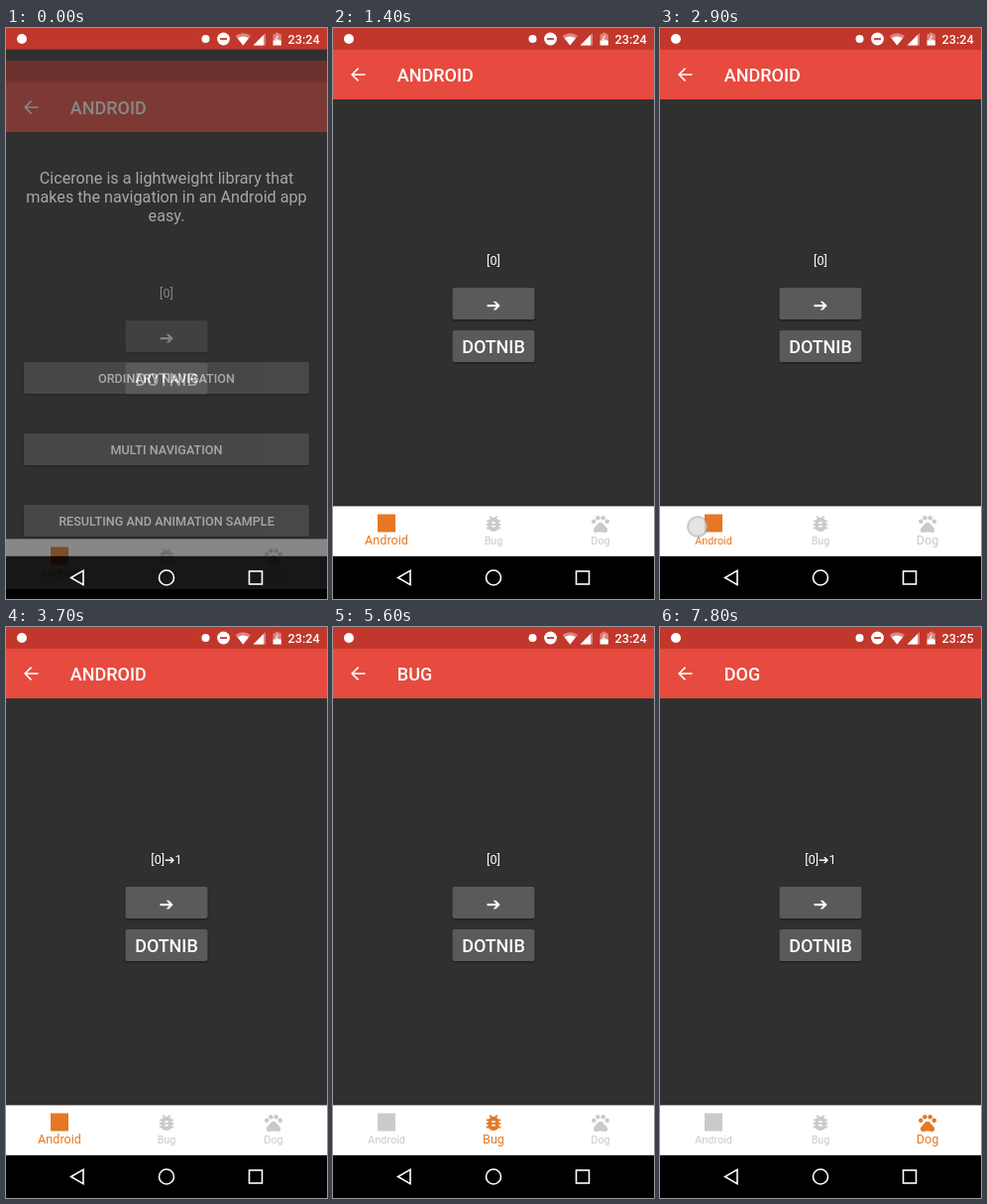
An HTML page for the animation above (8 s loop, 324x576 px).

```html
<!DOCTYPE html>
<html lang="en">
<head>
<meta charset="utf-8">
<title>Tab navigation sample</title>
<style>
  html, body { margin: 0; width: 100%; height: 100%; overflow: hidden; background: #000; }
  svg { display: block; width: 100%; height: 100%; font: 12.6px Roboto, "DejaVu Sans", sans-serif; }
  text { fill: #fff; white-space: pre; }
  .mid { text-anchor: middle; }
  .med { font-weight: 500; }
  .big { font-size: 18px; }
  .line { fill: none; stroke: #fff; stroke-width: 1.6; }
  .btn { fill: #5a595b; filter: drop-shadow(0 1px .8px rgba(0, 0, 0, .45)); }
  .tab { fill: currentColor; stroke: none; }
  .tab text { fill: currentColor; }
</style>
</head>
<body>
<svg viewBox="0 0 324 576">
  <defs>
    <radialGradient id="spot">
      <stop offset="0" stop-color="#e4e4e4" stop-opacity=".9"/>
      <stop offset=".7" stop-color="#dadada" stop-opacity=".75"/>
      <stop offset=".86" stop-color="#a0a0a0" stop-opacity=".6"/>
      <stop offset="1" stop-color="#888" stop-opacity="0"/>
    </radialGradient>
  </defs>

  <rect width="324" height="533" fill="#303030"/>
  <g id="home">
    <g class="mid" font-size="16.2">
      <text x="162" y="157">Cicerone is a lightweight library that</text>
      <text x="162" y="176">makes the navigation in an Android app</text>
      <text x="162" y="195">easy.</text>
    </g>
  </g>

  <g id="page">
    <rect width="324" height="533" fill="#303030"/>
    <rect width="324" height="22" fill="#c2372b"/>
    <rect y="21.6" width="324" height="50.4" fill="#e74a3e"/>
    <path class="line" stroke-width="1.8" d="M32.5 47H19.5M25.6 40.6L19.2 47l6.4 6.4"/>
    <text id="title" class="med big" x="64.8" y="53.5"></text>
    <text id="chain" class="mid" x="162" y="238.5"></text>
    <rect class="btn" x="120.5" y="262" width="83" height="32" rx="2"/>
    <text class="mid big" x="162" y="285.5">➔</text>
    <rect class="btn" x="120.5" y="305" width="83" height="32" rx="2"/>
    <text class="mid med big" x="162" y="328">DOTNIB</text>
    <rect y="481.6" width="324" height="1" fill="#272727"/>
    <rect y="482.4" width="324" height="50.6" fill="#fff"/>
    <g class="tab">
      <rect x="45" y="490.5" width="18" height="18"/>
      <text class="mid" x="54" y="521">Android</text>
    </g>
    <g class="tab">
      <g transform="translate(151.2 489.2) scale(.9)">
        <rect x="6" y="5" width="12" height="16" rx="6"/>
        <path d="M4 9h16M4 13h16M4 17h16M7.7 3.7l3 3M16.3 3.7l-3 3" stroke="currentColor" stroke-width="2"/>
        <path d="M10 11h4M10 15h4" stroke="#fff" stroke-width="2"/>
      </g>
      <text class="mid" x="162" y="521">Bug</text>
    </g>
    <g class="tab">
      <g transform="translate(259.2 489.2) scale(.9)">
        <circle cx="4.5" cy="9.5" r="2.5"/><circle cx="9" cy="5.5" r="2.5"/>
        <circle cx="15" cy="5.5" r="2.5"/><circle cx="19.5" cy="9.5" r="2.5"/>
        <path d="M12 10.5c2.5 0 3.5 2.4 5.3 4.4c1.4 1.4 3 2.8 2.6 4.8c-.3 1-1 2-2.3 2.3c-.8.1-3.1-.5-5.6-.5s-4.8.6-5.6.5c-1.3-.3-2-1.3-2.3-2.3c-.4-2 1.2-3.4 2.6-4.8c1.8-2 2.8-4.4 5.3-4.4z"/>
      </g>
      <text class="mid" x="270" y="521">Dog</text>
    </g>
  </g>

  <!-- status bar -->
  <rect width="324" height="21.6" fill="#c2372b"/>
  <g fill="#fff">
    <circle cx="16" cy="11" r="5"/>
    <circle cx="201.5" cy="11" r="4"/>
    <circle cx="219.5" cy="11" r="6.4"/>
    <path d="M216 11h7" stroke="#c2372b" stroke-width="1.8"/>
    <path d="M231.5 8q7.8-5.6 15.6 0L239.3 17.5z" opacity=".4"/>
    <path d="M233.6 10.2q5.7-3.6 11.4 0L239.3 17.5z"/>
    <path d="M262 5v12.4h-12.4z" opacity=".4"/>
    <path d="M260 7v10.4h-10.4z"/>
    <path d="M269.6 6.2h2.4V4.8h3.4v1.4h2.4v11.2h-8.2z" opacity=".4"/>
    <path d="M269.6 12.5h8.2v4.9h-8.2z"/>
    <path d="M274.6 7.5l-2.6 4.6h3.4l-2.6 4" fill="none" stroke="#fff"/>
  </g>
  <text id="clock" class="med" x="316.6" y="16" text-anchor="end"></text>

  <!-- system navigation -->
  <rect y="532.8" width="324" height="44" opacity=".78"/>
  <g class="line">
    <path d="M78 547.3v14.4L65.6 554.5z"/>
    <circle cx="162" cy="554.5" r="7.5"/>
    <rect x="245.5" y="548" width="13" height="13"/>
  </g>

  <circle id="touch" r="11.5" fill="url(#spot)"/>
</svg>

<script>
const $ = id => document.getElementById(id);
const tabs = [...document.querySelectorAll(".tab")];
const titles = ["ANDROID", "BUG", "DOG"];
const LOOP = 8000, STEP = 100, NEXT = -1;

// Each tap: press time, release time, x, y, chosen tab (or NEXT for the arrow button)
const taps = [
  [1500, 1700, 165, 504, 1],
  [2300, 2400, 268, 504, 2],
  [2800, 2900, 38, 503, 0],
  [3400, 3600, 182, 277, NEXT],
  [4000, 4200, 180, 277, NEXT],
  [4500, 4700, 177, 277, NEXT],
  [5100, 5200, 165, 504, 1],
  [5700, 5800, 181, 277, NEXT],
  [6100, 6200, 181, 277, NEXT],
  [6700, 6900, 281, 519, 2],
  [7500, 7600, 179, 277, NEXT]
];

["ORDINARY NAVIGATION", "MULTI NAVIGATION", "RESULTING AND ANIMATION SAMPLE"].forEach((label, i) => {
  const y = 337 + 72 * i;
  $("home").innerHTML += `<rect class="btn" x="18" y="${y}" width="288" height="32" rx="2"/>
    <text class="mid med" x="162" y="${y + 20.5}">${label}</text>`;
});

function draw(t) {
  let tab = 0, last = 0, since = 200, depth = 0, touch = null;
  for (const tap of taps) {
    const [down, up, , , action] = tap;
    if (t >= down && t < up + STEP) touch = tap;
    if (t < up) continue;
    if (action === NEXT) depth++;
    else { last = tab; tab = action; since = up; depth = 0; }
  }

  // The page rises into place while it fades in
  const rise = t < 400 ? 33 * Math.exp(-t / 80) : 0;
  $("page").setAttribute("transform", `translate(0 ${rise})`);
  $("page").setAttribute("opacity", Math.min(1, 0.42 + t * 0.0045));

  $("title").textContent = titles[tab];
  $("chain").textContent = "[0]" + Array.from({ length: depth }, (_, i) => "➔" + (i + 1)).join("");
  $("clock").textContent = t < 7500 ? "23:24" : "23:25";

  const grow = Math.max(0, Math.min(1, (t - since) / 200));
  tabs.forEach((g, i) => {
    const size = i === tab ? grow : i === last ? 1 - grow : 0;
    g.style.color = i === tab ? "#e67823" : "#cacaca";
    g.querySelector("text").style.fontSize = 10.8 + 1.8 * size + "px";
  });

  $("touch").style.display = touch ? "" : "none";
  if (touch) $("touch").setAttribute("transform", `translate(${touch[2]} ${touch[3]})`);
}

const start = performance.now();
function frame() {
  const t = (performance.now() - start) % LOOP;
  draw(Math.floor(t / STEP) * STEP);
  requestAnimationFrame(frame);
}
frame();
</script>
</body>
</html>
```
